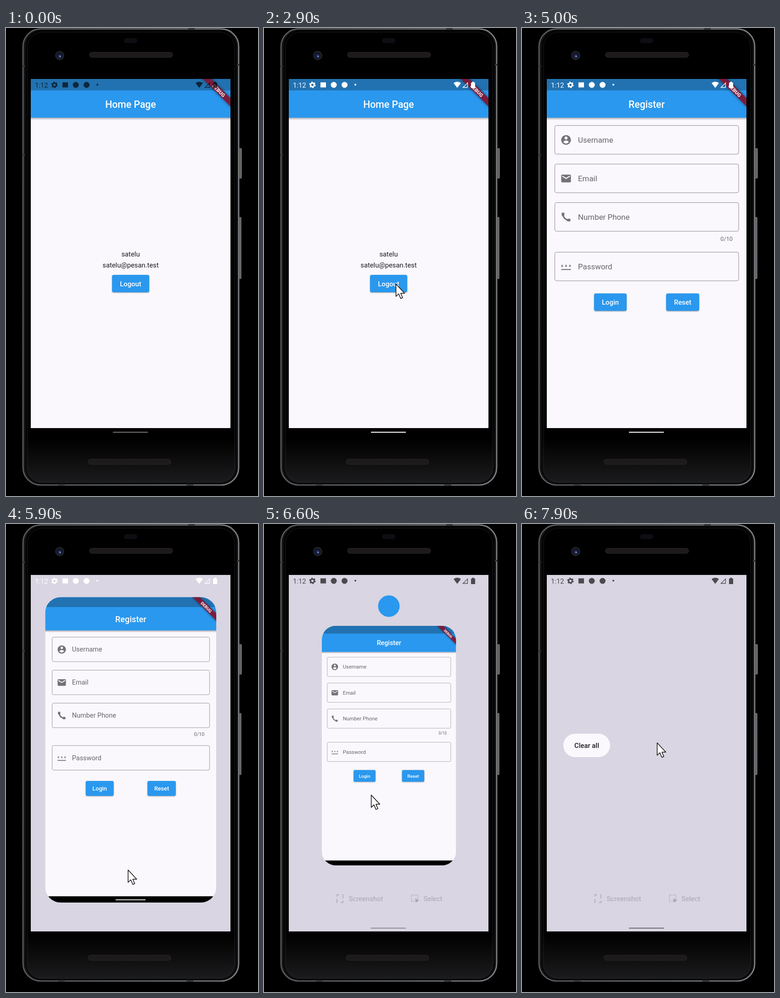
These frames come from a looping animation (549 px wide and 1020 px high, 8000 ms). An HTML page:

```html
<!DOCTYPE html>
<html lang="en">
<head>
<meta charset="utf-8">
<title>Phone walkthrough</title>
<style>
  html, body { margin: 0; width: 100%; height: 100%; overflow: hidden; background: #000; }
  svg { display: block; width: 100vw; height: 100vh; font-family: Roboto, sans-serif; }
  .mid { text-anchor: middle; }
  .title { font-size: 21.2px; font-weight: 500; fill: #fff; }
  .body { font-size: 14.8px; fill: #1d1c20; }
  .label { font-size: 16.9px; fill: #67656a; }
  .button rect { fill: #2a98ee; filter: drop-shadow(0 1.5px 1.3px rgba(0, 0, 0, .4)); }
  .button text { font-size: 14.8px; font-weight: 500; fill: #fff; }
  .box { fill: none; stroke: #8b898e; }
  .glyph { fill: #747277; }
  .line { fill: none; stroke: #747277; }
  .action { font-size: 14.9px; fill: #a9a6b3; }
  .dashed { fill: none; stroke: #a9a6b3; stroke-width: 1.5; }
  .slot { fill: #1d1a1b; stroke: #2b2829; }
</style>
</head>
<body>
<svg viewBox="0 0 549 1020" preserveAspectRatio="none">
  <defs>
    <linearGradient id="rim">
      <stop stop-color="#5d6062"/><stop offset="1" stop-color="#85888a"/>
    </linearGradient>
    <linearGradient id="face" x2="0" y2="1">
      <stop offset=".9"/><stop offset="1" stop-color="#1c1c1e"/>
    </linearGradient>
    <linearGradient id="key">
      <stop stop-color="#2b2c2d"/><stop offset=".7" stop-color="#77797b"/><stop offset="1" stop-color="#47494b"/>
    </linearGradient>
    <linearGradient id="shade" x2="0" y2="1">
      <stop stop-opacity=".32"/><stop offset="1" stop-opacity="0"/>
    </linearGradient>
    <clipPath id="screenClip"><rect x="54" y="111" width="435" height="777"/></clipPath>
    <clipPath id="cardClip"><rect id="cardShape" x="54" y="111" width="435" height="777"/></clipPath>
  </defs>

  <rect width="549" height="1020"/>
  <g id="phone">
    <rect x="507" y="262" width="7" height="66" rx="2" fill="url(#key)"/>
    <rect x="507" y="412" width="6" height="135" rx="2" fill="url(#key)"/>
    <rect x="37" y="2" width="470" height="994" rx="38" fill="#1a1b1c" stroke="url(#rim)" stroke-width="2.5"/>
    <rect x="43" y="5" width="459" height="988" rx="35" fill="url(#face)" stroke="#08080a" stroke-width="3"/>
    <rect x="47" y="9" width="451" height="980" rx="32" fill="none" stroke="#1f2021"/>
    <path d="M35 83h6M503 80h6M35 277h6M397 2h14M113 996h15M393 996h15" stroke="#323436" stroke-width="4"/>
    <rect x="257" y="22" width="29" height="11" rx="5" fill="#0d0d12"/>
    <rect class="slot" x="182" y="53" width="181" height="11" rx="5"/>
    <rect class="slot" x="179" y="940" width="180" height="11" rx="5"/>
    <circle cx="117" cy="60" r="10" fill="#22242b"/>
    <circle cx="117" cy="60" r="7" fill="#10121c"/>
    <circle cx="117" cy="61" r="4" fill="#26306a"/>
    <circle cx="118" cy="62" r="1.5" fill="#8a9be0"/>
  </g>

  <g clip-path="url(#screenClip)">
    <rect id="backdrop" x="54" y="111" width="435" height="777" fill="#d9d5e2"/>
    <g id="actions">
      <rect class="dashed" x="159" y="808" width="13" height="17" stroke-dasharray="5 7 9 5 9 7 9 5 4"/>
      <text class="action" x="184.5" y="822">Screenshot</text>
      <rect class="dashed" x="321" y="808.5" width="14" height="14" stroke-dasharray="2 1.5"/>
      <path d="M329 816l9 4-7 5z" fill="#a9a6b3"/>
      <text class="action" x="347.5" y="822">Select</text>
    </g>
    <g id="clear">
      <rect x="90" y="457" width="102" height="51" rx="25.5" fill="#fbf9fd"/>
      <text class="body mid" x="141" y="488" font-weight="500">Clear all</text>
    </g>
    <circle id="appIcon" cx="272" cy="179" r="23.5" fill="#2a98ee"/>
    <g id="app"><g clip-path="url(#cardClip)">
      <g id="home"></g>
      <g id="register"></g>
      <g transform="translate(489 111) rotate(45)">
        <rect x="-46" y="29.6" width="92" height="12.7" fill="#7b1c3c" style="filter:drop-shadow(0 0 3px rgba(0,0,0,.5))"/>
        <text class="mid" y="39.8" font-size="10.8" font-weight="900" fill="#f4e9ee">DEBUG</text>
      </g>
      <rect x="54" y="872" width="435" height="16"/>
      <rect id="appHandle" x="233" y="880" width="76" height="2" fill="#fff"/>
    </g></g>
    <rect id="handle" x="233" y="880" width="76" height="1.5"/>
    <g id="status">
      <text x="63" y="129.5" font-size="14.8">1:12</text>
      <g fill="none" stroke="currentColor">
        <circle cx="105.5" cy="124" r="4" stroke-width="3"/>
        <circle cx="105.5" cy="124" r="6" stroke-width="2.2" stroke-dasharray="3 3.283"/>
        <path d="M433.5 129.5h10v-10z" stroke-width="1.3"/>
      </g>
      <rect x="123" y="118.5" width="12" height="11"/>
      <circle cx="152" cy="124" r="6.5"/>
      <circle cx="175.5" cy="124" r="6.5"/>
      <circle cx="199" cy="123.5" r="2"/>
      <path d="M413 120q8-6 16 0l-8 10.5z"/>
      <path d="M451 119h2.5v-2h4v2h2.5v12h-9z"/>
    </g>
  </g>
  <path id="cursor" d="M.5 0V27L6.500 21.500 10.800 31.500 15 29.700 10.800 20.200H19.300Z" fill="#fff" stroke="#111" stroke-width="1.5" stroke-linejoin="round"/>
</svg>

<script>
const LOOP = 8000, STEP = 100;
const CARD_SCALE = 0.672, SCROLL = 118;
const el = id => document.getElementById(id);

const page = title => `
  <rect x="54" y="111" width="435" height="762" fill="#faf8fc"/>
  <rect x="54" y="195" width="435" height="6" fill="url(#shade)"/>
  <rect x="54" y="111" width="435" height="84.5" fill="#2a98ee"/>
  <rect x="54" y="111" width="435" height="25" fill="#2272b1"/>
  <text class="title mid" x="271.5" y="174">${title}</text>`;

const button = (x, y, w, label) => `<g class="button">
  <rect x="${x}" y="${y}" width="${w}" height="38" rx="4"/>
  <text class="mid" x="${x + w / 2}" y="${y + 24.7}">${label}</text></g>`;

const field = (y, label, glyph) => `
  <rect class="box" x="71.5" y="${y}" width="400.5" height="62.5" rx="4"/>
  <g class="glyph" transform="translate(83.3 ${y + 18.8}) scale(1.058)">${glyph}</g>
  <text class="label" x="122" y="${y + 37}">${label}</text>`;

const star = x => `<path class="line" d="M${x} 8v5m-2-4 4 3m0-3-4 3"/>`;

const glyphs = {
  user: `<circle cx="12" cy="12" r="10"/><g fill="#faf8fc"><circle cx="12" cy="8" r="3"/>
    <path d="M6 16q6-6 12 0-6 7-12 0z"/></g>`,
  mail: `<rect x="2" y="4" width="20" height="16" rx="2"/>
    <path d="M4 7l8 5 8-5" fill="none" stroke="#faf8fc" stroke-width="2"/>`,
  phone: `<path class="line" d="M5 5a15 15 0 0 0 14 14" stroke-width="3"/>
    <rect x="3" y="3" width="5.5" height="6.5" rx="1"/><rect x="14.5" y="15.5" width="6.5" height="5.5" rx="1"/>`,
  password: `<rect x="2" y="17" width="20" height="2"/>${[4, 12, 20].map(star).join("")}`
};

el("home").innerHTML = page("Home Page") + `
  <g id="account">
    <text class="body mid" x="271.5" y="498">satelu</text>
    <text class="body mid" x="271.5" y="522">satelu@pesan.test</text>
  </g>` + button(231, 538, 81, "Logout") +
  `<rect id="ripple" x="231" y="538" width="81" height="38" rx="4" fill="#fff"/>`;

el("register").innerHTML = page("Register") +
  field(212.5, "Username", glyphs.user) +
  field(296.5, "Email", glyphs.mail) +
  field(380.5, "Number Phone", glyphs.phone) +
  `<text x="459" y="464" text-anchor="end" font-size="12.7" fill="#67656a">0/10</text>` +
  field(488.5, "Password", glyphs.password) +
  button(157, 578.5, 71, "Login") + button(314, 578.5, 72, "Reset");

const ramp = (t, from, to) => Math.max(0, Math.min(1, (t - from) / (to - from)));
const easeOut = k => 1 - (1 - k) ** 2;
const mix = (a, b, k) => a + (b - a) * k;
const set = (id, name, value) => el(id).setAttribute(name, value);
const show = (id, opacity) => set(id, "opacity", opacity);

// The pointer glides from place to place; a glide's end is the next one's start.
function pointer(t) {
  let x = 504, y = 395;
  const glide = (from, to, toX, toY, ease = easeOut) => {
    const k = ease(ramp(t, from, to));
    x = mix(x, toX, k);
    y = mix(y, toY, k);
  };
  glide(1300, 1500, 343, 441);
  glide(1500, 2000, 287, 558);
  glide(4600, 4900, 549, 580);
  glide(5500, 5800, 274, 859);
  glide(5800, 6200, 254.5, 619);
  glide(6500, 6800, 216, 568);
  glide(6800, 7100, 334, 562);
  glide(7300, 7600, 294, 477, k => k);
  return [x, y];
}

function draw(t) {
  const light = ramp(t, 100, 400) - ramp(t, 6300, 6500);
  const enter = easeOut(ramp(t, 4300, 4600));
  const shrink = easeOut(ramp(t, 5800, 6200));
  const overview = ramp(t, 6300, 6600);
  const scroll = easeOut(ramp(t, 6800, 7100));
  const fling = 700 * ramp(t, 7300, 7700) ** 1.5;

  set("cursor", "transform", `translate(${pointer(t)})`);
  show("cursor", (t >= 1300 && t < 4900) || t > 5500 ? 1 : 0);

  const tone = `rgb(${Array(3).fill(Math.round(255 * light))})`;
  el("status").style.color = tone;
  set("status", "fill", tone);
  show("status", mix(.65, 1, light));

  show("account", t < 3800 ? 1 : 0);
  show("ripple", .1 * (ramp(t, 3400, 3600) - ramp(t, 4300, 4500)));
  show("register", enter);
  set("register", "transform", `translate(272 490) scale(${mix(.88, 1, enter)}) translate(-272 -490)`);

  const scale = mix(1, CARD_SCALE, shrink);
  const left = mix(54, 126, shrink) + SCROLL * scroll;
  const top = mix(111, 222, shrink) - fling;
  set("app", "transform", `translate(${left} ${top}) scale(${scale}) translate(-54 -111)`);
  set("cardShape", "rx", 45 * Math.min(1, shrink * 2));

  // Keeps the backdrop from bleeding around the app while it fills the screen.
  show("backdrop", shrink > 0 ? 1 : 0);
  show("appHandle", mix(.45, 1, light) * (1 - overview));
  show("handle", .45 * overview + .2 * ramp(t, 7300, 7900));
  show("actions", overview);
  show("appIcon", overview);
  set("appIcon", "transform", `translate(${SCROLL * scroll} ${-fling})`);
  show("clear", scroll);
  set("clear", "transform", `translate(${SCROLL * (scroll - 1)} 0)`);
}

const start = performance.now();
function tick() {
  const t = (performance.now() - start) % LOOP;
  draw(Math.floor(t / STEP) * STEP);
  requestAnimationFrame(tick);
}
tick();
</script>
</body>
</html>
```
